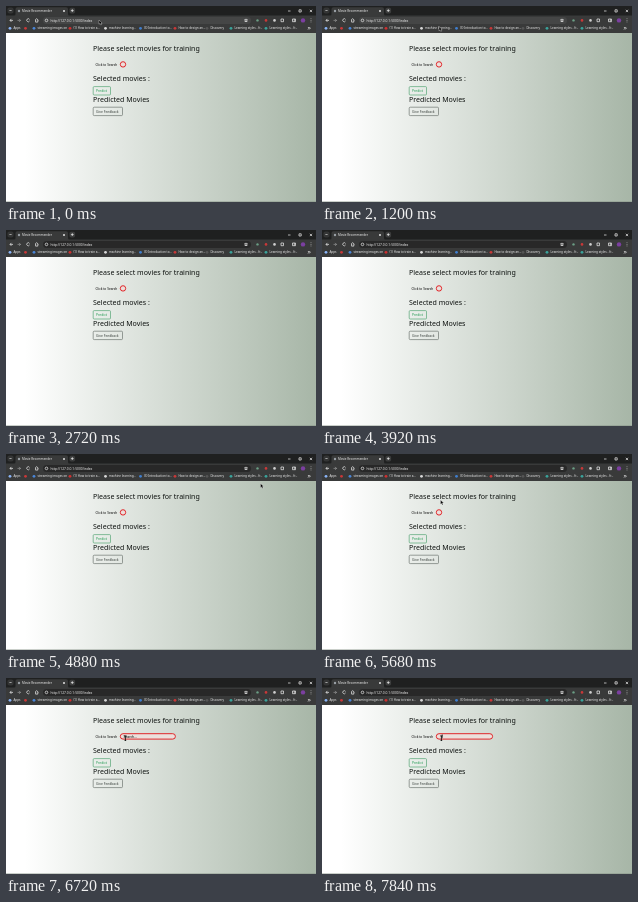
These frames come from a looping animation (310 px wide and 196 px high, 8 s). An HTML page:

```html
<!DOCTYPE html>
<html lang="en">
<head>
<meta charset="utf-8">
<title>Movie picker</title>
<style>
html, body { margin: 0; width: 100%; height: 100%; overflow: hidden; }
svg { display: block; width: 100%; height: 100%; font-family: "Noto Sans", sans-serif; }
.heading { font-size: 7.05px; fill: #0c100e; }
.small { font-size: 3.35px; font-weight: 500; }
.bar { font-size: 3px; font-weight: 500; fill: #f0f0f0; }
.icon { fill: none; stroke: #efefef; stroke-width: .7; }
</style>
</head>
<body>
<svg viewBox="0 0 310 196">
  <defs>
    <linearGradient id="page">
      <stop offset=".06" stop-color="#fff"/>
      <stop offset="1" stop-color="#a7b6a7"/>
    </linearGradient>
    <clipPath id="pillClip"><rect id="clip" x="114.5" y="55" height="7"/></clipPath>
  </defs>

  <rect y="26" width="310" height="170" fill="url(#page)"/>
  <rect y="195.3" width="310" height=".7" fill="#7f8a80" opacity=".6"/>

  <!-- Browser window -->
  <rect width="310" height="10" fill="#1f2020"/>
  <rect y="9.5" width="310" height="17.5" fill="#393a3a"/>
  <rect x="1.5" y="1.5" width="6" height="6" rx="1.8" fill="#343535"/>
  <path d="M8 10Q9.5 10 9.5 8V3Q9.5 1.3 11.5 1.3H60Q62 1.3 62 3V8Q62 10 63.5 10Z" fill="#393a3a"/>
  <rect x="63.5" y="1.8" width="5.6" height="5.6" rx="1.6" fill="#3c3d3d"/>
  <circle cx="13" cy="5" r="1.2" fill="#9aa0a6"/>
  <text class="bar" x="16" y="6">Movie Recommender</text>
  <rect id="address" x="37" y="10.9" width="208" height="7" rx="3.5"/>
  <text class="bar" x="44.5" y="15.7" style="font-size:3.3px">http://127.0.0.1:5000/index</text>
  <g class="icon">
    <path d="M3.5 4l1 1 1-1M57 4l2 2m0-2l-2 2M66.3 3.2v2.8m-1.4-1.4h2.8"/>
    <path d="M282 5h2.5M293 3.8h2.2v2.2h-2.2zM303.8 3.8l2.3 2.3m0-2.3l-2.3 2.3"/>
    <path d="M7 14.4H4m1.4-1.5L4 14.4l1.4 1.5"/>
    <path d="M11.5 14.4h3m-1.4-1.5l1.4 1.5-1.4 1.5" opacity=".5"/>
    <path d="M23.5 13.4a1.5 1.5 0 1 0 .1 1.5M29 14.2l1.7-1.5 1.7 1.5M29.6 14v2.1h2.2V14"/>
    <circle cx="40.5" cy="14.4" r="1.3"/>
    <path d="M240 12.9l.5 1h1l-.8.7.3 1.2-1-.7-1 .7.3-1.2-.8-.7h1z"/>
    <path d="M275 13h2.5v2.7H275zM286.5 13h3v2.7h-3zM288.3 13v2.7"/>
    <path d="M305 12.5v.6m0 1v.6m0 1v.6M302 21l1 1.2-1 1.2m1.3-2.4l1 1.2-1 1.2"/>
  </g>
  <circle cx="251.5" cy="14.4" r="1.2" fill="#6b9f85"/>
  <circle cx="260" cy="14.4" r="1.3" fill="#c93838"/>
  <circle cx="268.5" cy="14.4" r="1.3" fill="#cfcfcf"/>
  <circle cx="297" cy="14.4" r="2.2" fill="#7b3fa0"/>
  <g id="bookmarks"></g>

  <!-- Page -->
  <text class="heading" x="87" y="45">Please select movies for training</text>
  <text class="small" x="89.5" y="59.6" fill="#000" style="font-size:3.2px">Click to Search</text>
  <rect id="pill" x="114.3" y="55.7" height="5.4" rx="2.7" fill="#ebe0dc" stroke="#e01418" stroke-width=".9"/>
  <g clip-path="url(#pillClip)">
    <text id="placeholder" class="small" x="117.6" y="59.5" fill="#000">Search...</text>
  </g>
  <path id="caret" d="M120.2 56.4v3.8" stroke="#111" stroke-width=".7"/>
  <text class="heading" x="87" y="75">Selected movies :</text>
  <rect x="87.2" y="80.6" width="17.3" height="8.4" rx="1" fill="none" stroke="#3f9b63" stroke-width=".6"/>
  <text class="small" x="90" y="86" fill="#1f9a50">Predict</text>
  <text class="heading" x="87" y="96.2">Predicted Movies</text>
  <rect x="87.2" y="101.2" width="29.3" height="8.4" rx="1" fill="none" stroke="#5c635f" stroke-width=".6"/>
  <text class="small" x="90" y="106.6" fill="#3a413d">Give Feedback</text>

  <g id="cursor">
    <path id="arrow" d="M0 0V4.3L1 3.4 1.8 5 2.6 4.6 1.9 3.1H3.2Z" fill="#000" stroke="#f4f4f4" stroke-width=".35"/>
    <path id="beam" d="M0 .2H2.4M1.2 .2V4.8M.4 4.8H2" fill="none" stroke="#000" stroke-width=".8"/>
  </g>
</svg>
<script>
const $ = id => document.getElementById(id);
const show = (id, visible) => $(id).style.display = visible ? "" : "none";
const LOOP = 8000;

// x, colour, label
const bookmarks = [
  [4, "#8ab4f8", "Apps"], [19.5, "#c93838", ""], [28, "#4a86d8", "streaming images on"],
  [64, "#cf3030", "(1) How to train a..."], [99.5, "#d8d8d8", "machine learning..."],
  [134.5, "#3f7fd0", "(3) Introduction to..."], [169, "#c93838", "How to design an..."],
  [201, "#555", "Discovery"], [225, "#3aa39b", "Learning styles - fr..."],
  [260, "#3aa39b", "Learning styles - fr..."]
];
$("bookmarks").innerHTML = bookmarks.map(([x, colour, label]) =>
  `<circle cx="${x}" cy="22.3" r="1.4" fill="${colour}"/>
   <text class="bar" x="${x + 3.4}" y="23.4">${label}</text>`).join("");

// Pointer stops: time, x, y; a stop without a position hides it.
const stops = [
  [0, 93, 14], [640], [1200, 117, 20.5], [1280], [4400, 182, 92], [4560, 189.5, 92.3],
  [4880, 254.5, 29.5], [5200, 245, 29.5], [5440, 120, 45.5], [5680, 118.5, 46], [5920, 118.2, 57.7]
];

function draw(t) {
  const [, x, y] = stops.findLast(stop => stop[0] <= t);
  show("cursor", x !== undefined);
  if (x !== undefined) $("cursor").setAttribute("transform", `translate(${x} ${y})`);
  const overInput = t >= 6400;
  show("arrow", !overInput);
  show("beam", overInput);

  // The address bar is lit while the pointer is near it.
  $("address").setAttribute("fill", t < 1280 ? "#454646" : "#282828");

  const progress = Math.min(1, Math.max(0, (t - 6350) / 520));
  const width = 5.4 + 50.9 * (1 - (1 - progress) ** 3);
  $("pill").setAttribute("width", width);
  $("clip").setAttribute("width", width - 1);
  show("placeholder", progress > 0 && t < 7560);
  show("caret", t >= 7840);
}

function tick() {
  draw(performance.now() % LOOP);
  requestAnimationFrame(tick);
}
tick();
</script>
</body>
</html>
```
